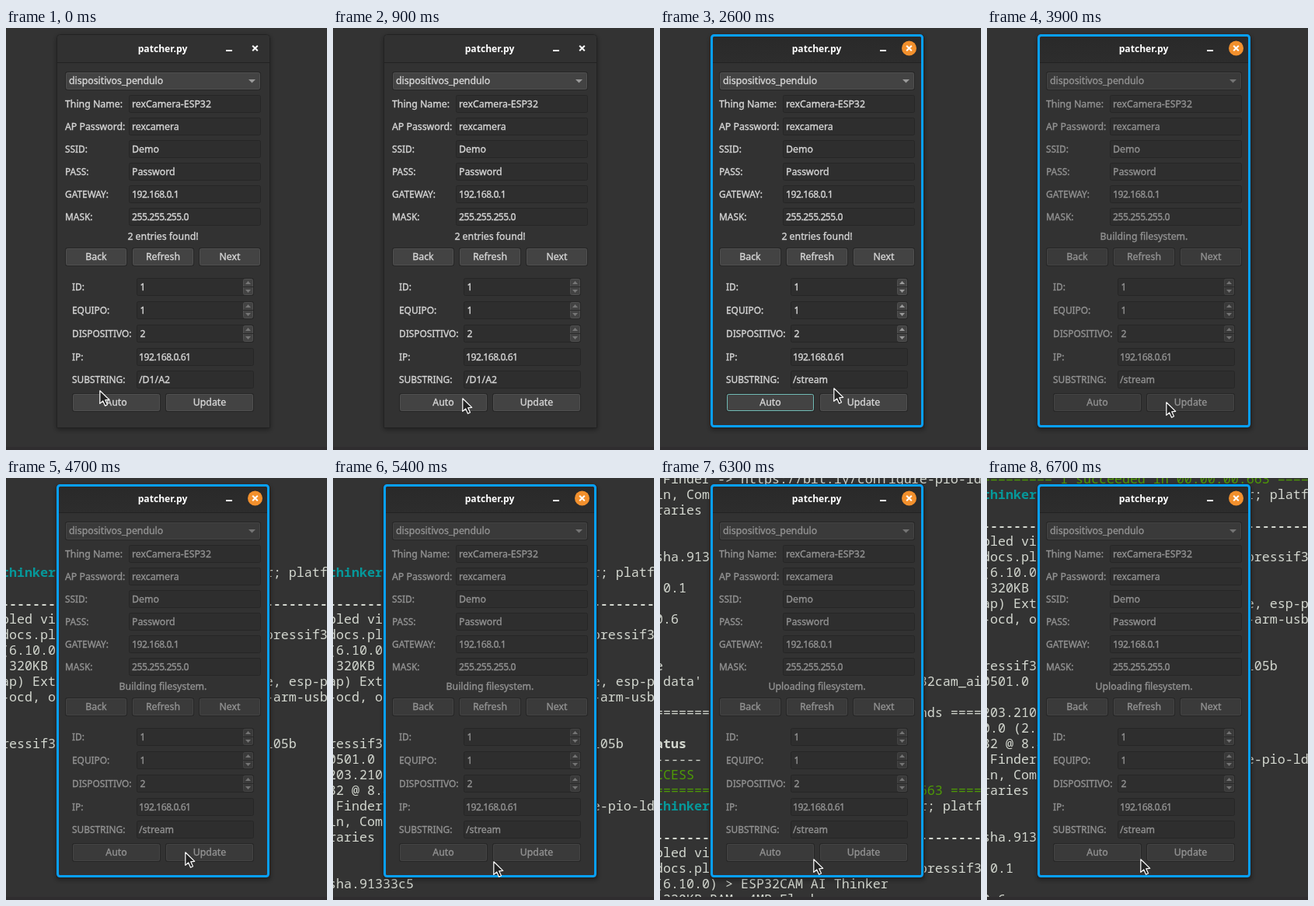
Write an HTML page that moves like this. It is 413 by 542 pixels and loops after 8 s.

```html
<!DOCTYPE html>
<html lang="en">
<head>
<meta charset="utf-8">
<title>patcher.py</title>
<style>
html, body { margin: 0; width: 100%; height: 100%; overflow: hidden; background: #333; }
svg { display: block; }
text { font: 500 12.3px "Noto Sans", "Open Sans", sans-serif; color: #d6d6d6; fill: currentColor; white-space: pre; }
#form text { stroke: currentColor; stroke-width: .35px; }
.caps { font-size: 11.9px; }
.num { font-size: 12.1px; letter-spacing: -.45px; }
.mid { text-anchor: middle; }
.title { font-size: 12.1px; font-weight: 700; color: #fff; }
#term text { font: 400 16.667px "Noto Sans Mono", "DejaVu Sans Mono", monospace; color: #d3d7cf; }
#term .b { font-weight: 700; }
.entry { fill: #2e2e2e; stroke: #262626; }
.btn { fill: #434343; stroke: #505050; }
.arrow { fill: #9a9a9a; }
.bar { fill: url(#bar); }
.idle .bar { fill: #313131; }
.idle .spin { fill: #767676; }
.busy #form text { color: #929292; }
.busy .btn { fill: #3a3a3a; stroke: #444; }
.busy .arrow { fill: #747474; }
.idle #hint, .idle #close { display: none; }
.ready #auto { stroke: #73bdb7; }
</style>
</head>
<body>
<svg id="stage" width="413" height="542" viewBox="0 0 413 542">
  <defs>
    <linearGradient id="bar" x2="0" y2="1"><stop stop-color="#292929"/><stop offset="1" stop-color="#2d2d2d"/></linearGradient>
    <filter id="shadow" x="-10%" y="-10%" width="120%" height="120%">
      <feDropShadow dx="0" dy="2" stdDeviation="3" flood-opacity=".4"/>
    </filter>
  </defs>
  <rect width="413" height="542" fill="#333"/>
  <g id="term"></g>
  <rect y="538" width="413" height="4" fill="#2f2d2f"/>
  <path d="M65.500 513.500v-501q0-4 4-4h266q4 0 4 4v501z" fill="#313131" stroke="#232323" filter="url(#shadow)"/>
  <path class="bar" d="M66 44V13q0-4 4-4h265q4 0 4 4v31z"/>
  <path d="M66 44.500h273" stroke="#222"/>
  <text class="title mid" x="201.500" y="31">patcher.py</text>
  <rect x="283" y="28" width="8" height="2" fill="#fff"/>
  <circle id="close" cx="320.500" cy="26" r="9.500" fill="#f2902d"/>
  <path d="M317.200 22.700l6.600 6.600m0-6.600l-6.600 6.600" stroke="#fff" stroke-width="2"/>
  <g id="form"></g>
  <rect id="hint" x="66.500" y="9.500" width="271" height="502" rx="3" fill="none" stroke="#08a0fa" stroke-width="3"/>
  <path id="cursor" d="M.8 .8v16.600l3.900-3.400 2.800 6.200 3-1.400-2.800-6 5-.4z" fill="#222" stroke="#fff" stroke-width="1.200" stroke-linejoin="round"/>
</svg>
<script>
const $ = id => document.getElementById(id);

// ---- form ----
const label = (s, x, y, cls = '', id = '') =>
  `<text x="${x}" y="${y + 4.6}" class="${cls}" id="${id}">${s}</text>`;
const box = (cls, x, y, w, h, id = '') =>
  `<rect class="${cls}" id="${id}" x="${x + .5}" y="${y + .5}" width="${w - 1}" height="${h - 1}" rx="2"/>`;
const raised = (x, y, w, h, id) =>
  box('entry', x, y, w, h) + box('btn', x + 1, y + 1, w - 2, h - 2, id);
const button = (s, x, y, w, id) =>
  raised(x, y, w, 24, id) + label(s, x + w / 2, y + 11.5, 'mid');
const kind = s => /^[\d.]+$/.test(s) ? 'num' : /^[A-Z:]+$/.test(s) ? 'caps' : '';

let form = raised(76, 56, 252, 24) + label('dispositivos_pendulo', 81, 67.5) +
  '<path class="arrow" d="M312 66h9l-4.500 4.500z"/>';

[['Thing Name:', 'rexCamera-ESP32'], ['AP Password:', 'rexcamera'], ['SSID:', 'Demo'],
 ['PASS:', 'Password'], ['GATEWAY:', '192.168.0.1'], ['MASK:', '255.255.255.0']
].forEach(([name, value], i) => {
  const y = 97 + 29 * i;
  form += label(name, 76, y, kind(name)) + box('entry', 158, y - 11, 170, 23) +
    label(value, 162, y, kind(value));
});

form += label('', 202, 267, 'mid', 'status');
['Back', 'Refresh', 'Next'].forEach((s, i) => form += button(s, 76 + 86 * i, 282, 80));

[['ID:', 1], ['EQUIPO:', 1], ['DISPOSITIVO:', 2]].forEach(([name, value], i) => {
  const y = 332 + 30 * i;
  form += label(name, 85, y, 'caps') + box('entry', 168, y - 11, 151, 23) +
    label(value, 172.5, y, 'num') + box('btn', 305, y - 10, 13, 21) +
    `<path class="arrow spin" d="M308 ${y - 3}h7l-3.500-4zm0 7h7l-3.500 4z"/>` +
    `<path d="M305 ${y + .5}h13" stroke="#2a2a2a"/>`;
});

[['IP:', '192.168.0.61'], ['SUBSTRING:', '']].forEach(([name, value], i) => {
  const y = 422 + 29 * i;
  form += label(name, 85, y, 'caps') + box('entry', 168, y - 11, 151, 23) +
    label(value, 171, y, kind(value), value ? '' : 'sub');
});
form += button('Auto', 85, 469, 114, 'auto') + button('Update', 205, 469, 114);
$('form').innerHTML = form;

// ---- terminal: text is already cropped at the left edge of the stage ----
const rule = ch => ch.repeat(42);
const run = tools => [
  'thinker (board: esp32cam_ai_thinker; platform', '', rule('-'),
  'bled via `-v, --verbose` option',
  'docs.platformio.org/page/boards/espressif32',
  '(6.10.0) > ESP32CAM AI Thinker',
  ' 320KB RAM, 4MB Flash',
  'ap) External (cmsis-dap, esp-bridge, esp-prog',
  '-ocd, olimex-arm-usb-ocd-h, olimex-arm-usb', '', '',
  'ressif32 @ 3.20017.241212+sha.dcc1105b',
  '0501.0 (4.5.1)', ...tools,
  '32 @ 8.4.0+2021r2-patch5',
  ' Finder -> https://bit.ly/configure-pio-ldf',
  'in, Compatibility ~ soft', 'raries', '.', '',
  'sha.91333c5', '', '.0.1', '', '0.6'
];
const equals = '='.repeat(9);
const lines = [
  ...run(['203.210628 (2.3)']), '', '', 'e',
  "'data' directory to .pio/build/esp32cam_ai-thinker", '',
  equals + ' [SUCCESS] Took 0.66 seconds ' + equals, '',
  'atus    Duration', '------  ------------', 'CCESS   00:00:00.663',
  equals + ' 1 succeeded in 00:00:00.663 ' + equals,
  ...run(['', '203.210628 (2.3)', '0.0 (2.30)'])
];
const TEAL = '#06989a', GREEN = '#4e9a06';
const tint = (color, s, cls = '') => `<tspan class="${cls}" style="fill:${color}">${s}</tspan>`;
const paint = s => s
  .replace(/>/g, '&gt;')
  .replace(/^thinker/, w => tint(TEAL, w, 'b'))
  .replace('[SUCCESS]', '[' + tint(GREEN, 'SUCCESS', 'b') + ']')
  .replace(/^CCESS|^.* succeeded .*/, w => tint(GREEN, w));
$('term').innerHTML = lines.map((s, i) =>
  `<text x="-6" y="${127 + 20 * i}" class="${/^(atus|-{20})/.test(s) ? 'b' : ''}">${paint(s)}</text>`).join('');
const rows = [...$('term').children];

// ---- motion ----
const LOOP = 8000, TICK = 100;
const CLICK = 1600, BUSY = 3900, UPLOAD = 6000;
const progress = (t, from, to) => Math.min(1, Math.max(0, (t - from) / (to - from)));
const ease = p => p * p * (3 - 2 * p);

// pointer moves: start, end, x, y
const moves = [
  [0, 500, 198, 488], [500, 900, 166, 475], [2000, 2400, 186, 453], [2500, 2600, 223, 462],
  [2800, 3000, 224, 488], [3100, 3300, 230, 480], [5200, 5400, 206, 492], [5900, 6000, 197, 489]
];
const pointer = t => moves.reduce(([x, y], [from, to, toX, toY]) => {
  const p = ease(progress(t, from, to));
  return [x + (toX - x) * p, y + (toY - y) * p];
}, [120, 465]);

function draw(now) {
  const t = Math.floor(now % LOOP / TICK) * TICK;
  const [x, y] = pointer(t).map(Math.round);
  $('cursor').setAttribute('transform', `translate(${x} ${y})`);
  $('stage').setAttribute('class', t < CLICK ? 'idle' : t < BUSY ? 'ready' : 'busy');
  $('sub').textContent = t < CLICK ? '/D1/A2' : '/stream';
  $('status').textContent = t < BUSY ? '2 entries found!' : t < UPLOAD ? 'Building filesystem.' : 'Uploading filesystem.';

  // the first run prints in place, then the rest scrolls up
  const scroll = Math.round(21 * progress(t, 5700, 6300) + 20 * progress(t, 6500, 6700));
  const count = scroll ? rows.length : Math.round(21 * progress(t, 4200, 5100));
  rows.forEach((row, i) => row.style.display = i < count ? '' : 'none');
  $('term').setAttribute('transform', `translate(0 ${-20 * scroll})`);
  requestAnimationFrame(draw);
}
requestAnimationFrame(draw);
</script>
</body>
</html>
```
